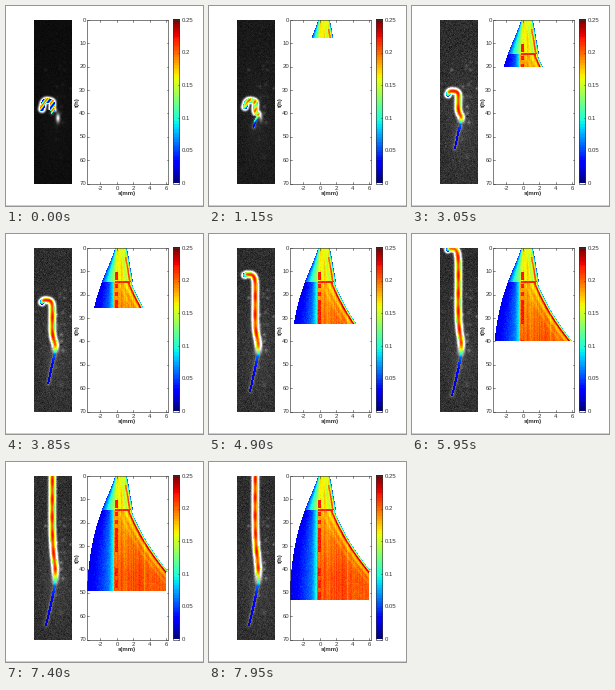
A matplotlib script that plays this animation: 197x200 px, repeating every 8 s.

```python
import numpy as np
import matplotlib.pyplot as plt
from matplotlib.animation import FuncAnimation
from matplotlib.patches import Rectangle

W, H = 197, 200
FRAMES, STEP = 160, 50
HOURS = 1 / 3                       # hours per frame
TOP, BOTTOM = 14, 177.5
PX_HOUR = (BOTTOM - TOP) / 70
INK = "0.2"
jet = plt.get_cmap("jet")
rng = np.random.default_rng(4)

plt.rcParams["font.family"] = "Liberation Sans"
fig = plt.figure(figsize=(W / 100, H / 100), dpi=100, facecolor="white")
ax = fig.add_axes([0, 0, 1, 1])
ax.axis("off")


def label(x, y, text, ha="center", **kw):
    ax.text(x, y, text, ha=ha, va="center", fontsize=4.3, color=INK, **kw)


def line(x, y):
    ax.plot(x, y, color=INK, lw=0.4, zorder=5)


def box(x0, x1):
    ax.add_patch(Rectangle((x0, TOP), x1 - x0, BOTTOM - TOP, fill=False,
                           ec=INK, lw=0.45, zorder=5))


def picture(data, x0, x1, y0, y1):
    return ax.imshow(data, extent=(x0, x1, y1, y0), aspect="auto",
                     interpolation="nearest", zorder=2)


def bump(x, centre, width):
    return np.exp(-((x - centre) / width) ** 2)


def ramp(x, start, end):
    return np.clip((x - start) / (end - start), 0, 1)


# ---- root on the left -------------------------------------------------
IX, IY, IW, IH = 28, 14, 38, 164
gx, gy = np.meshgrid(IX + np.arange(IW) + 0.5, IY + np.arange(IH) + 0.5)
grain = rng.normal(0, 1, gx.shape)
glow = 0.4 * bump(gx, 50, 16) * bump(gy, 118, 45)
for _ in range(22):
    sx, sy = rng.normal(54, 6), rng.uniform(40, 160)
    size = rng.uniform(0.8, 2)
    glow += rng.uniform(0.3, 1.3) * bump(gx, sx, size) * bump(gy, sy, size)


def pose(sec):
    """Control points from hook tip over the collar to the tail tip."""
    top = 95 - 24.5 * 0.2 * np.log1p(np.exp((sec - 2.7) / 0.2))
    droop = max(0, 8 - 1.7 * sec)
    collar = 114 - 9 * np.exp(-sec / 2)
    tip = 107 + 56 * np.sin(np.pi / 2 * min(sec / 7, 1))
    reach = 1 - np.exp(-sec)
    return np.array([
        (36, top + droop),
        (38, top - 1),
        (46, top),
        (46.5, top + 0.25 * (collar - top)),
        (46, top + 0.75 * (collar - top)),
        (47 + 3.5 * reach, collar),
        (46, (collar + tip) / 2),
        (46 - 6 * min(sec / 6, 1), tip),
    ])


def smooth(p):
    """Corner cutting; the third column keeps the place along the root."""
    p = np.column_stack([p, np.arange(len(p))])
    for _ in range(3):
        a, b = p[:-1], p[1:]
        mid = np.empty((2 * len(a), 3))
        mid[0::2], mid[1::2] = 0.75 * a + 0.25 * b, 0.25 * a + 0.75 * b
        p = np.vstack([p[:1], mid, p[-1:]])
    return p


def nearest(p):
    """Distance to the curve and place along it for every pixel."""
    best = np.full(gx.shape, 1e9)
    place = np.zeros(gx.shape)
    for (x0, y0, k0), (x1, y1, k1) in zip(p[:-1], p[1:]):
        dx, dy = x1 - x0, y1 - y0
        u = np.clip(((gx - x0) * dx + (gy - y0) * dy) / (dx * dx + dy * dy + 1e-9), 0, 1)
        d = np.hypot(gx - x0 - u * dx, gy - y0 - u * dy)
        closer = d < best
        best[closer] = d[closer]
        place[closer] = (k0 + u * (k1 - k0))[closer]
    return best, place


def root_image(i):
    sec = i * STEP / 1000
    d, k = nearest(smooth(pose(sec)))
    young = max(0, 1 - sec / 2)
    stem = 1 - ramp(k, 4.8, 5.4)

    noise = 0.7 * grain + 0.4 * np.random.default_rng(100 + i).normal(0, 1, d.shape)
    base = 0.05 + 0.13 * min(sec / 3, 1)
    gray = base * (1 + glow + 0.25 * noise)
    gray += 1.2 * stem * np.exp(-(d / 4) ** 4)
    gray += 0.25 * (1 - stem) * bump(d, 0, 2.2)
    gray += 0.9 * young * bump(gx, 52, 2) * bump(gy, 112, 4.5)
    rgb = np.repeat(np.clip(gray, 0, 1)[..., None], 3, axis=2)

    body = 0.86 - 0.4 * np.exp(-k / 0.4) + 0.04 * np.sin(gy * 0.35 + sec) - 0.06 * d ** 2
    tail = 0.06 + 0.36 * np.exp(-1.8 * np.maximum(k - 5, 0))
    grown = stem * body + (1 - stem) * tail
    start = 0.45 + 0.35 * np.sin(gx * 0.9 + gy * 0.7)
    v = young * start + (1 - young) * grown
    on = d < 0.9 + 0.4 * ramp(k, 7, 5) + 1.0 * stem
    rgb[on] = jet(np.clip(v, 0.02, 0.97))[..., :3][on]
    return rgb


# ---- space-time map ---------------------------------------------------
MX0, MX1 = 81, 162
mx, my = np.meshgrid(np.arange(MX0, MX1) + 0.5, np.arange(14, 178) + 0.5)
BREAK = 48                          # row where the root starts to speed up


def growth_map():
    left = 79 + 30 * np.exp(-((my - TOP) / 52) ** 1.3)
    z = np.maximum(my - BREAK - 2, 0)
    right = np.where(my < BREAK, 121 + 6 * (my - TOP) / 34,
                     126 + 0.4 * z + 0.0035 * z ** 2)
    edge = right - mx
    late = my >= BREAK

    blue = 0.1 + 0.2 * ramp(mx, left, 108) ** 1.5 + 0.1 * ramp(mx, 103, 108)
    green = 0.15 + 0.5 * ramp(mx, left, 111) ** 0.8
    cool = np.where(late, blue, green)

    streak = rng.normal(0, 0.015, mx.shape[1])
    warm = 0.68 + late * (0.06 + 0.08 * ramp(my, 50, 115)) + streak
    warm -= 0.09 * bump(edge, 6, 1.8) + 0.04 * bump(edge, 12, 1.5)
    warm += 0.16 * bump(edge, 3, 0.9) * (my > 23)
    warm -= 0.5 * ramp(edge, 2.2, 0)
    v = np.where(mx < np.where(late, 108, 111), cool, warm)

    dash = np.repeat(rng.random(42) < 0.7, 4)[:len(my), None]
    v = np.where((abs(mx - 110.5) < 1.1) & dash & (my > 38), 0.88, v)
    v = np.where((abs(my - BREAK) < 0.9) & (mx > 109) & (edge > 2), 0.87, v)
    v += rng.normal(0, 0.012, v.shape)
    rgba = jet(np.clip(v, 0.03, 0.95))
    limit = np.where(my > 110, 160, right)
    rgba[..., 3] = (mx >= left) & (mx <= limit)
    return rgba


full_map = growth_map()


def map_image(i):
    out = full_map.copy()
    out[my > TOP + i * HOURS * PX_HOUR] = 0
    return out


# ---- fixed parts ------------------------------------------------------
root = picture(root_image(0), IX, IX + IW, IY, IY + IH)
plot = picture(map_image(0), MX0, MX1, 14, 178)
picture(jet(np.linspace(1, 0, 64))[:, None, :], 167, 174, TOP, BOTTOM)
box(81.5, 162.5)
box(167.5, 173.5)

for h in range(0, 71, 10):
    y = TOP + h * PX_HOUR
    line([81.5, 83], [y, y])
    line([161, 162.5], [y, y])
    label(80, y, str(h), "right")
for s in range(-2, 7, 2):
    x = 111 + 8.25 * s
    line([x, x], [BOTTOM - 1.5, BOTTOM])
    line([x, x], [TOP, TOP + 1.5])
    label(x, 182, str(s))
for n in range(6):
    y = BOTTOM - n * (BOTTOM - TOP) / 5
    line([172, 173.5], [y, y])
    label(175.5, y, f"{n * 0.05:.2g}", "left")
label(121, 187.5, "s(mm)", weight="bold")
label(71, 96, "t(h)", weight="bold", rotation=90)
ax.plot([0, W], [198.5, 198.5], color="0.8", lw=0.7)
ax.set_xlim(0, W)
ax.set_ylim(H, 0)


def draw(i):
    root.set_data(root_image(i))
    plot.set_data(map_image(i))
    return root, plot


anim = FuncAnimation(fig, draw, frames=FRAMES, interval=STEP, repeat=True,
                     repeat_delay=0, blit=False)
plt.show()
```
